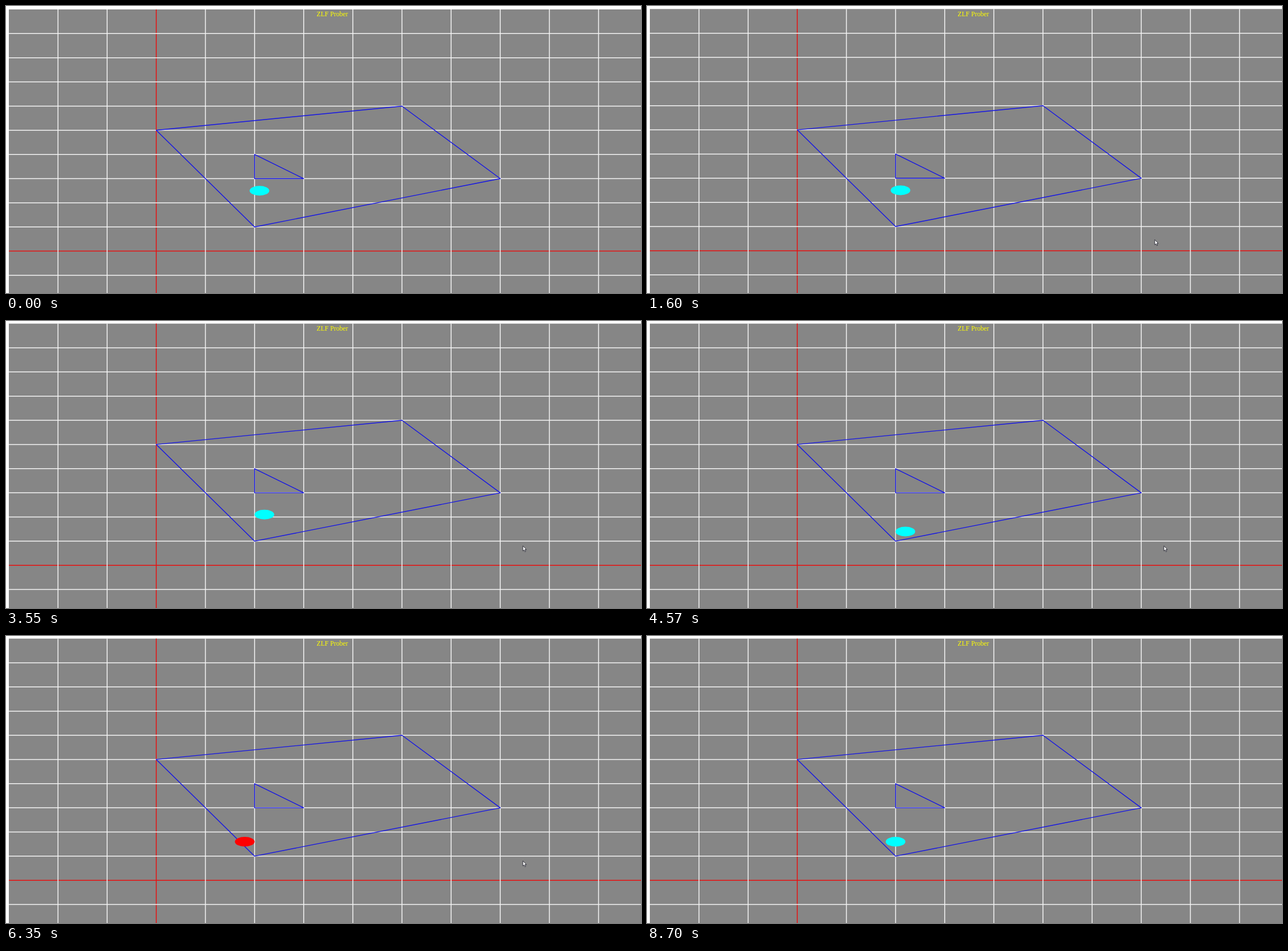
Recreate the animation shown at these times as an HTML page. Size 1113x503 px, loop 9.09 s.

```html
<!DOCTYPE html>
<html lang="en">
<head>
<meta charset="utf-8">
<title>ZLF Prober</title>
<style>
  html, body { margin: 0; width: 100%; height: 100%; overflow: hidden; background: #fff; }
  svg { display: block; width: 1113px; height: 503px; }
  path { fill: none; }
  .field { fill: #868686; }
  .grid { stroke: #f4f4f4; stroke-width: 1.5; }
  .axes { stroke: #e81010; stroke-width: 1.5; }
  .walls { stroke: #1414e6; stroke-width: 1.4; stroke-linejoin: round; }
  text { font: 11.7px "Liberation Serif", "Times New Roman", serif; fill: #ff0; text-anchor: middle; }
  #cursor path { fill: #fff; stroke: #22222e; stroke-width: .9; stroke-linejoin: round; }
</style>
</head>
<body>
<svg viewBox="0 0 1113 503">
  <g id="scene">
    <rect class="field" x="5" y="-423.6" width="1108" height="520"/>
    <path class="axes" id="axes"/>
    <path class="grid" id="grid"/>
    <path class="walls" id="walls"/>
    <ellipse id="ball" rx="17.2" ry="8.5"/>
    <text x="572" y="-411.2">ZLF Prober</text>
  </g>
  <g id="cursor"><path d="M.5 .5V9.6L2.5 7.8L4 11L5.4 10.4L4 7.2H6.6Z"/></g>
</svg>
<script>
const LOOP = 9090, UX = 86.13, UY = 42.36, X0 = 263.4;
const RADIUS = 0.2, KEY_REPEAT = 145;
const $ = id => document.getElementById(id);
const px = x => X0 + x * UX;
const py = y => -y * UY;

const shapes = [
  [[0, 5], [5, 6], [7, 3], [2, 1]],
  [[2, 4], [2, 3], [3, 3]]
];

const hLine = y => `M5 ${py(y)}H1113`;
const vLine = x => `M${px(x)} ${py(10)}V96`;
let grid = "";
for (let i = -2; i <= 9; i++) if (i) grid += hLine(i) + vLine(i);
$("grid").setAttribute("d", grid);
$("axes").setAttribute("d", hLine(0) + vLine(0));
$("walls").setAttribute("d", shapes.map(s =>
  "M" + s.map(([x, y]) => px(x) + " " + py(y)).join("L") + "Z").join(""));

// Held keys move the ball a tenth of a unit per repeat
const presses = [
  { at: 2970, keys: "r" + "d".repeat(13) },
  { at: 5335, keys: "uuuullll" },
  { at: 7440, keys: "rr" }
];

// Cursor glides: quadratic curves sampled in even steps
const rest = [889.5, 409], aside = [905.5, 393.5];
const glides = [
  { start: 120, end: 440, steps: 4, curve: [[1046, 489], [930, 425], rest] },
  { start: 2035, end: 2380, steps: 3, curve: [rest, [910, 368], aside] },
  { start: 8047, end: 8700, steps: 7, curve: [aside, [1033, 30], [1070, 620]] }
];

function ballAt(t) {
  let x = 21, y = 25;
  for (const { at, keys } of presses) {
    const count = Math.max(0, Math.floor((t - at) / KEY_REPEAT) + 1);
    for (const key of keys.slice(0, count)) {
      x += (key === "r") - (key === "l");
      y += (key === "u") - (key === "d");
    }
  }
  return [x / 10, y / 10];
}

function cursorAt(t) {
  // Before the first glide it is still off stage from the last one
  const time = t < glides[0].start ? t + LOOP : t;
  const { start, end, steps, curve: [a, b, c] } =
    glides.filter(g => g.start <= time).pop();
  const k = Math.min(1, Math.floor(steps * (time - start) / (end - start)) / steps);
  const mix = i => (1 - k) ** 2 * a[i] + 2 * k * (1 - k) * b[i] + k * k * c[i];
  return [mix(0), mix(1)];
}

function wallDistance(x, y, [ax, ay], [bx, by]) {
  const dx = bx - ax, dy = by - ay;
  const k = ((x - ax) * dx + (y - ay) * dy) / (dx * dx + dy * dy);
  const c = Math.max(0, Math.min(1, k));
  return Math.hypot(x - ax - c * dx, y - ay - c * dy);
}

const touches = (x, y) => shapes.some(s =>
  s.some((p, i) => wallDistance(x, y, p, s[(i + 1) % s.length]) < RADIUS));

function draw(t) {
  const scroll = 0.7 * ((t >= 1600) + (t >= 1760));
  $("scene").setAttribute("transform", `translate(0 ${429.6 - scroll})`);

  const [x, y] = ballAt(t), ball = $("ball");
  ball.setAttribute("cx", px(x));
  ball.setAttribute("cy", py(y));
  ball.setAttribute("fill", touches(x, y) ? "#f00" : "#0ff");

  $("cursor").setAttribute("transform", `translate(${cursorAt(t).join(" ")})`);
}

const start = performance.now();
function tick() {
  draw((performance.now() - start) % LOOP);
  requestAnimationFrame(tick);
}
tick();
</script>
</body>
</html>
```
